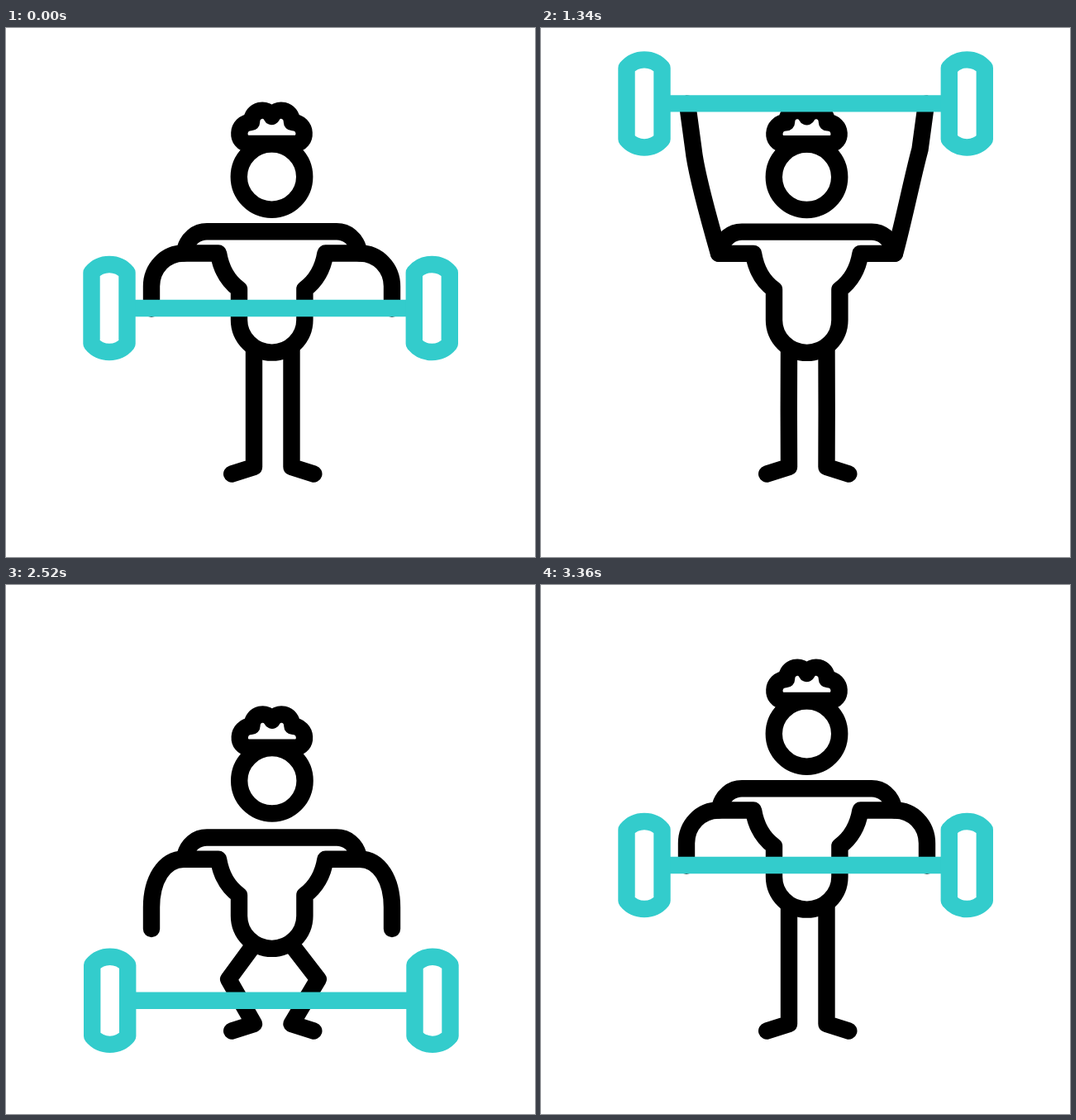
These frames come from a looping animation (640x640 px, 3.6 s). An HTML page:

```html
<!DOCTYPE html>
<html lang="en">
<head>
<meta charset="utf-8">
<title>Weightlifter</title>
<style>
html, body { margin: 0; height: 100%; overflow: hidden; background: #fff; }
svg { display: block; width: 100%; height: 100%; }
path, circle { fill: none; stroke: #000; stroke-width: 20.4; stroke-linecap: round; stroke-linejoin: round; }
#bar path { stroke: #33cccc; stroke-linecap: butt; }
</style>
</head>
<body>
<svg viewBox="0 0 640 640">
  <path id="legs"/>
  <path id="torso"/>
  <path id="arms"/>
  <g id="head">
    <circle cx="321.5" cy="180" r="39.7"/>
    <path d="M294 140C278 140 278 114 297 114C297 98 316 95 321.5 107C327 95 346 98 346 114C365 114 365 140 349 140Z"/>
  </g>
  <g id="bar">
    <path d="M146 0H494"/>
    <path id="plate" d="M103.5 -43A28 28 0 0 1 146.5 -43V43A28 28 0 0 1 103.5 43Z"/>
    <use href="#plate" x="390.3"/>
  </g>
</svg>
<script>
const LOOP = 3600;
const $ = id => document.getElementById(id);
const shape = (id, d) => $(id).setAttribute('d', d);
const move = (id, x, y) => $(id).setAttribute('transform', `translate(${x} ${y})`);

function draw(t) {
  // Smooth 0 to 1 between two times
  const ramp = (from, to) => {
    const u = Math.min(1, Math.max(0, (t - from) / (to - from)));
    return u * u * (3 - 2 * u);
  };
  const brace = ramp(0, 360), press = ramp(360, 617), drop = ramp(1325, 1685);
  const pull = ramp(2835, 3355);

  const dip = brace - press + drop - ramp(1685, 2203);
  const squat = ramp(2206, 2850) - ramp(2850, 3355);
  const raise = press - drop;
  const bend = (d, s) => d * dip + s * squat;

  const chest = bend(68, 123), hip = bend(43, 98);
  const shoulder = 272.5 + chest, collar = 246.3 + chest;
  const waist = 316 + chest, pelvis = 353 + hip;

  const leg = (x, side, knee) =>
    `M${x} ${388 + hip}L${x + side * knee} ${463 + bend(18, 29)}L${x} 531L${x + side * 26.8} 539.5`;

  // Elbow and hand hang below the shoulder and swing above it when raised
  const arm = (x, side, bow) => {
    const at = (dx, dy) => `${x + side * dx} ${shoulder + dy} `;
    const ex = 39 - 8.5 * raise, ey = 40 + 38 * squat - 167 * raise;
    const hand = 67 + 7 * dip + 36 * squat - 249.5 * raise;
    return `M${at(0, 0)}C${at(22 + 5 * squat - 12 * raise, -36 * raise)}` +
      at(ex - (9 - bow) * raise, ey - 22 - 21 * squat + 55 * raise) +
      `${at(ex, ey)}L${at(39 - raise, hand)}`;
  };

  shape('legs', leg(300, -1, bend(45, 64)) + leg(345.5, 1, bend(38, 67)));
  shape('arms', arm(215, -1, 5.5) + arm(428, 1, 0));
  shape('torso',
    `M216.5 ${268 + chest}C220 ${255 + chest} 230 ${collar} 243 ${collar}` +
    `H400C413 ${collar} 423 ${255 + chest} 426.5 ${268 + chest}` +
    `M215 ${shoulder}H257C260 ${shoulder + 18} 268 ${waist - 10} 282 ${waist}V${pelvis}` +
    `A39.7 39.7 0 0 0 361.4 ${pelvis}V${waist}` +
    `C375 ${waist - 10} 383.5 ${shoulder + 18} 386.5 ${shoulder}H428`);

  const drift = drop - pull;
  move('head', 0.4 * drift, bend(60, 118));
  move('bar', 0.7 * drift, 339 + 75 * brace - 324.7 * press + 413.5 * drop - 163.8 * pull);
}

let start;
function tick(now) {
  start ??= now;
  draw((now - start) % LOOP);
  requestAnimationFrame(tick);
}
draw(0);
requestAnimationFrame(tick);
</script>
</body>
</html>
```
